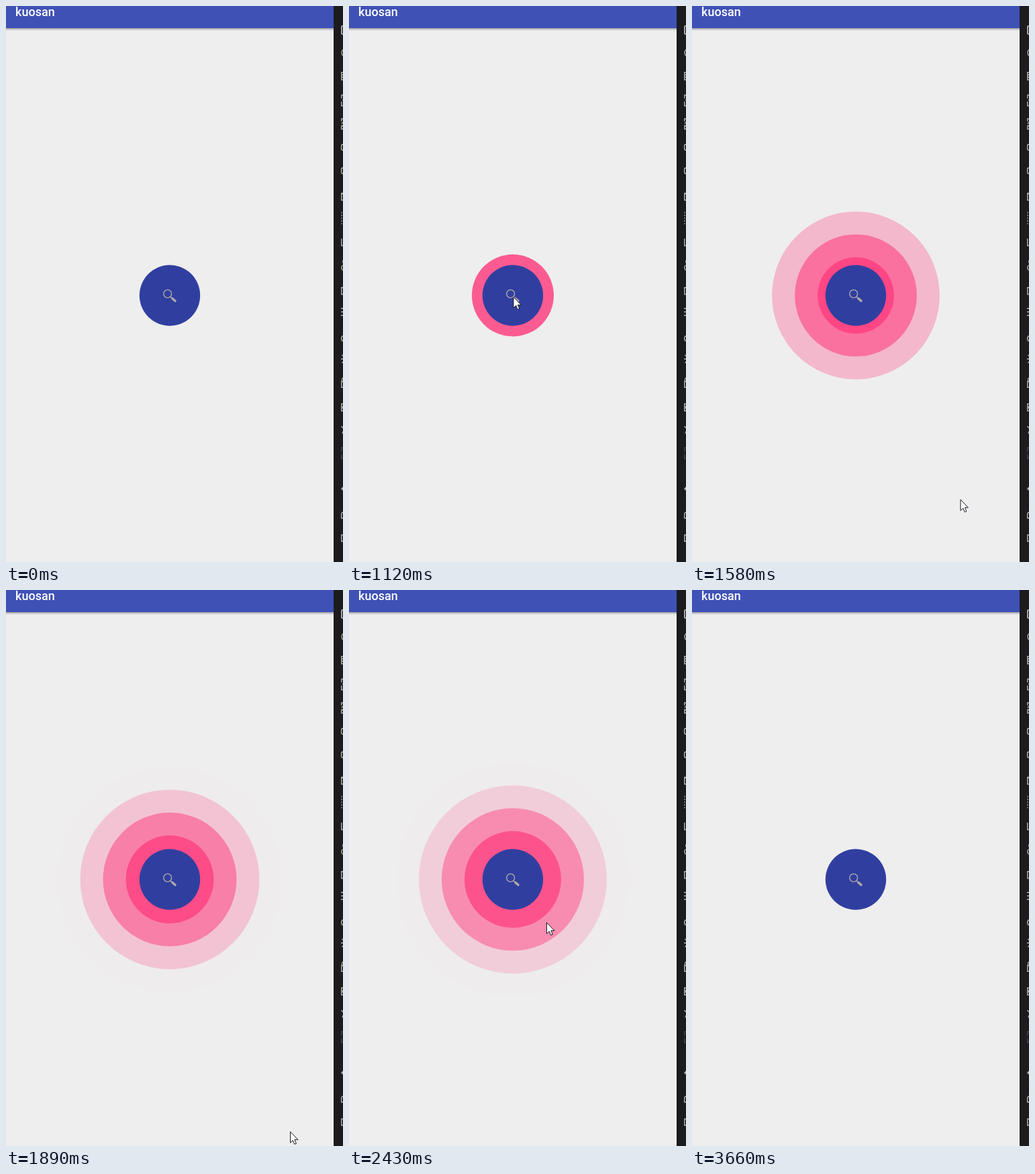
Animation of 502 by 827 pixels, one loop 4.21 s. Source, as an HTML page:

```html
<!DOCTYPE html>
<html lang="en">
<head>
<meta charset="utf-8">
<title>Ripple button</title>
<style>
  html, body { margin: 0; width: 100%; height: 100%; overflow: hidden; background: #eee; }
  svg { display: block; width: 100vw; height: 100vh; }
  .title { font: 500 18px Roboto, sans-serif; fill: #fff; }
  .ring { fill: #ff4081; }
  .icons { fill: none; stroke: #b4b4b4; stroke-width: 1.4; }
</style>
</head>
<body>
<svg viewBox="0 0 502 827">
  <defs>
    <linearGradient id="shade" x2="0" y2="1">
      <stop offset="0" stop-color="#000" stop-opacity=".3"/>
      <stop offset="1" stop-color="#000" stop-opacity="0"/>
    </linearGradient>
  </defs>
  <rect width="502" height="827" fill="#eee"/>
  <rect width="488" height="33" fill="#3f51b5"/>
  <rect y="33" width="488" height="4" fill="url(#shade)"/>
  <text class="title" x="14" y="15">kuosan</text>

  <g id="rings"></g>

  <circle cx="244" cy="430.5" r="45.2" fill="#303f9f"/>
  <g fill="none" stroke="#b0aaa8">
    <circle cx="240.7" cy="428" r="5.9" stroke-width="1.4"/>
    <path d="M245 432.5l3 2.8" stroke-width="1.5"/>
    <path d="M247.8 435l4.2 3.6" stroke-width="3.4" stroke-linecap="round"/>
  </g>

  <!-- emulator toolbar, cut off by the right edge -->
  <rect x="488" width="14" height="827" fill="#1c1c1e"/>
  <g class="icons">
    <path d="M504 29.7h-2.5q-1.6 0-1.6 1.6v9q0 1.6 1.6 1.6h2.5" stroke-width="1.8"/>
    <circle cx="506" cy="69.5" r="6"/>
    <path d="M504 98.7h-4.2v11h4.2M500 102.5h4M500 106h4"/>
    <path d="M504 132.5h-4.2v5M499.8 142v6.5h4.2M501 140h3"/>
    <path d="M504 167.7h-4.2v4M499.8 178v5h4.2M500 175l4-4M500 177l4 4"/>
    <path d="M504 205.7h-2q-2.4 0-2.4 2.4v4q0 2.4 2.4 2.4h2"/>
    <path d="M504 240.7h-2q-2.4 0-2.4 2.4v4q0 2.4 2.4 2.4h2"/>
    <path d="M504 278.5h-4.2v10.2h4.2M500 279.5h4"/>
    <path d="M500 306.5v18M503 306.5v18" stroke-dasharray="1.6 2.5"/>
    <path d="M499.8 346v10.5h4.2"/>
    <path d="M504 377q-3 1-2 5M504 386q-4-1-4.2 3t4.2 4"/>
    <path d="M504 418.7h-4.2v10h4.2"/>
    <path d="M499 449.7h5M499 455h5M499 460.3h5"/>
    <path d="M504 490.5q-4.4 0-4.4 4t4.4 4"/>
    <path d="M499 525h5M500.5 519l3 3M500.5 531l3-3"/>
    <path d="M504 558.7h-4.2v8.6h4.2M500.5 558v-2q0-3 3.5-3.5"/>
    <path d="M504 591.7h-4.2v10.5h4.2M501.5 595v4"/>
    <path d="M499.5 625l4 4M503 631l-2 5"/>
    <path d="M504 657h-4.2v6M499.8 667v6h4.2" stroke="#4a4358"/>
    <path d="M499 718l5-5v10z" fill="#b4b4b4" stroke="none"/>
    <path d="M504 752.7q-4.4 0-4.4 4v5h4.4"/>
    <path d="M504 786.7h-4.2v9.5h4.2"/>
  </g>

  <path id="cursor" d="M.5.8V17.2L4.3 13.6 6.8 19.4 9.4 18.3 7 12.7H12z"
        fill="#fff" stroke="#15151c" stroke-width="1" stroke-linejoin="round"/>
</svg>
<script>
const LOOP = 4210, TICK = 540 / 7, PHASE = 40;
const GAP = 34, SPEED = 0.138;
const RIPPLE_END = 2700, CURSOR_IN = 130, CURSOR_OUT = 3655;

// time, x, y of the pointer tip
const path = [
  [130, 392, 812], [580, 225, 498], [810, 245, 436], [1120, 244.5, 432],
  [1200, 247, 438], [1580, 399, 732], [1660, 413, 770], [1740, 420, 795],
  [1890, 423, 805], [2050, 422, 800], [2200, 381, 561], [2430, 294, 494],
  [2740, 291, 487.5], [3280, 291, 487.5], [3590, 433, 799]
];

const cursor = document.getElementById('cursor');
const rings = [5, 4, 3, 2, 1].map(slot => {
  const el = document.createElementNS('http://www.w3.org/2000/svg', 'circle');
  el.setAttribute('class', 'ring');
  el.setAttribute('cx', 244);
  el.setAttribute('cy', 430.5);
  document.getElementById('rings').append(el);
  return { el, slot };
});

const clamp = (v, lo, hi) => Math.min(hi, Math.max(lo, v));

function pointAt(t) {
  const i = clamp(path.findIndex(p => p[0] > t), 0, path.length);
  if (t >= path[path.length - 1][0]) return path[path.length - 1].slice(1);
  if (i === 0) return path[0].slice(1);
  const a = path[i - 1], b = path[i];
  const k = (t - a[0]) / (b[0] - a[0]);
  return [a[1] + (b[1] - a[1]) * k, a[2] + (b[2] - a[2]) * k];
}

function drawRings(t) {
  const front = 61 + (t - 1120) * SPEED;
  for (const { el, slot } of rings) {
    const r = front % GAP + slot * GAP;
    const on = front > 0 && r <= front + 0.01 && r < 180 && t < RIPPLE_END;
    el.setAttribute('r', on ? r : 0);
    el.setAttribute('opacity', clamp((161.6 - r) / 119.7, 0.007, 1));
  }
}

function draw(now) {
  const time = now % LOOP;
  // the screen refreshes at about 13 frames a second
  const t = PHASE + Math.floor((time + 8 - PHASE) / TICK) * TICK;
  drawRings(t);
  const [x, y] = pointAt(t);
  cursor.setAttribute('transform', `translate(${x} ${y})`);
  cursor.setAttribute('visibility',
    time >= CURSOR_IN && time < CURSOR_OUT ? 'visible' : 'hidden');
}

const start = performance.now();
function loop() {
  draw(performance.now() - start);
  requestAnimationFrame(loop);
}
loop();
</script>
</body>
</html>
```
